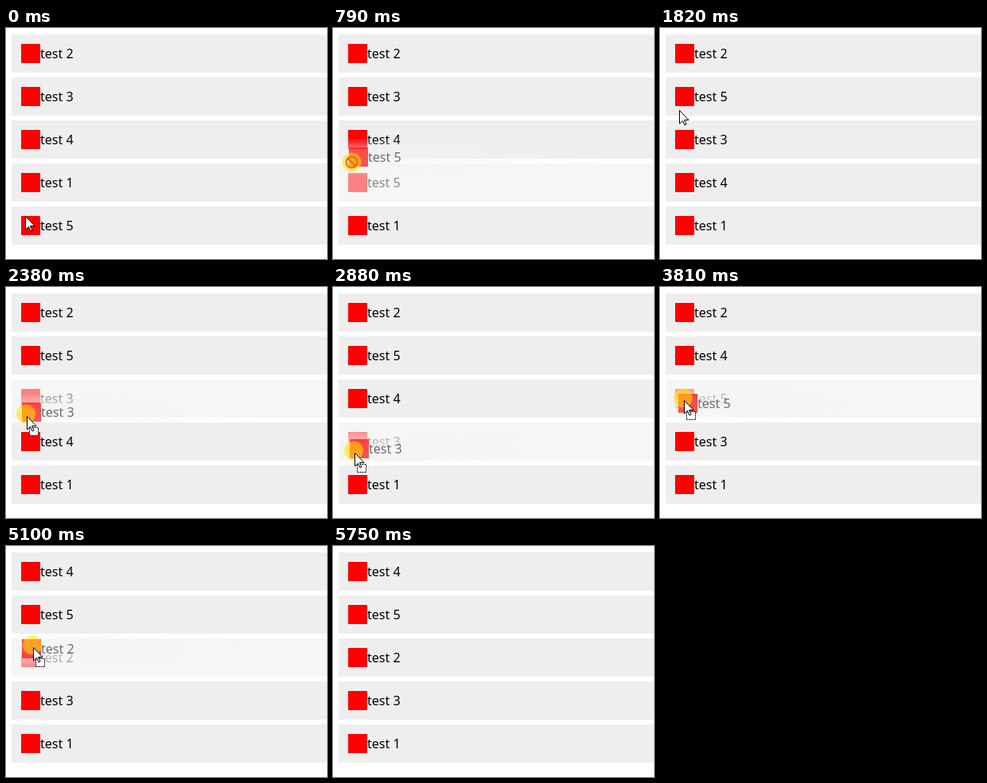
An HTML page with a canvas that plays this animation: 403 px wide and 290 px high, repeating every 5780 ms.

```html
<!DOCTYPE html>
<html lang="en">
<head>
<meta charset="utf-8">
<title>Sortable list</title>
<style>
html, body { margin: 0; width: 100%; height: 100%; overflow: hidden; background: #fff; }
canvas { display: block; }
</style>
</head>
<body>
<canvas id="stage" width="403" height="290"></canvas>
<script>
const ctx = document.getElementById('stage').getContext('2d');
const LOOP = 5780, PITCH = 54, ROW_H = 48, LEFT = 7, TOP = 8;

// The pointer rests, performs four drags, then leaves the stage.
const point = (x, y) => ({ x, y });
const rest = { drop: 50, to: point(24, 236) };
const exit = { press: 5745, from: point(325, 296) };
const drags = [
  { press: 170, stop: 1470, drop: 1640, from: point(22, 254), to: point(24, 74) },
  { press: 2230, stop: 2780, drop: 2960, from: point(25, 145), to: point(27, 208) },
  { press: 3410, stop: 3860, drop: 4050, from: point(26, 82), to: point(31, 149) },
  { press: 4650, stop: 5200, drop: 5300, from: point(33, 30), to: point(34, 148) }
];

const arrow = new Path2D('M0 0V16.5L4 13L6.500 18.500L8.500 17.500L6 12H11.500Z');
const hand = new Path2D('M-2 2Q0-2 2 2V7Q9 6 10 10V16L8 22H-1L-7 13Q-5 10-2 14Z');
const knuckles = new Path2D('M2 7V12M5 8V12M8 9V12');

const progress = (t, from, to) => Math.min(1, Math.max(0, (t - from) / (to - from)));
const mix = (a, b, k) => point(a.x + (b.x - a.x) * k, a.y + (b.y - a.y) * k);
const easeOut = k => k * (3 - k) / 2;

function pointer(t) {
  const active = drags.find(d => t >= d.press && t < d.drop);
  if (active) return mix(active.from, active.to, progress(t, active.press, active.stop));
  const last = drags.findLast(d => t >= d.drop) || rest;
  const next = drags.find(d => t < d.press) || exit;
  return mix(last.to, next.from, easeOut(progress(t, last.drop, next.press)));
}

const slotAt = y => Math.floor((y - TOP) / PITCH);
const inGap = y => y - TOP - slotAt(y) * PITCH >= ROW_H;

// A row gives way once the pointer enters it; gaps keep the last slot.
const targetSlot = (y, startY) => slotAt(y) + (inGap(y) && y < startY ? 1 : 0);

function listAt(t) {
  const order = [2, 3, 4, 1, 5];
  let lifted = null, held = false;
  for (const { press, stop, drop, from, to } of drags) {
    if (t < press) break;
    const now = mix(from, to, progress(t, press, stop));
    const home = slotAt(from.y);
    const [item] = order.splice(home, 1);
    order.splice(targetSlot(now.y, from.y), 0, item);
    held = t < drop;
    if (held && Math.abs(now.y - from.y) > 3)
      lifted = { item, x: LEFT + now.x - from.x, y: TOP + home * PITCH + now.y - from.y };
  }
  return { order, lifted, held };
}

function content(item, x, y, red, ink) {
  ctx.fillStyle = red;
  ctx.fillRect(x + 12, y + 12, 24, 24);
  ctx.fillStyle = ink;
  ctx.fillText('test ' + item, x + 36, y + 30);
}

function drawRow(item, slot, faded) {
  const y = TOP + slot * PITCH;
  ctx.fillStyle = faded ? '#f6f6f6' : '#eee';
  ctx.fillRect(LEFT, y, 396, ROW_H);
  content(item, LEFT, y, faded ? '#ff8080' : '#f00', faded ? '#888' : '#000');
}

// The lifted row fades out around the grab point.
function drawLifted({ item, x, y }) {
  x = Math.round(x);
  y = Math.round(y);
  ctx.save();
  ctx.translate(x, y + ROW_H / 2);
  ctx.scale(14, 1);
  const haze = ctx.createRadialGradient(0, 0, 0, 0, 0, 24);
  haze.addColorStop(0, 'rgba(243,243,243,.85)');
  haze.addColorStop(1, 'rgba(243,243,243,0)');
  ctx.fillStyle = haze;
  ctx.fillRect(0, -24, 28, ROW_H);
  ctx.restore();
  ctx.globalAlpha = 0.7;
  content(item, x, y, '#ff0a0a', '#333');
  ctx.globalAlpha = 1;
}

function outline(shape) {
  ctx.fillStyle = '#fff';
  ctx.fill(shape);
  ctx.stroke(shape);
}

function drawBlocked() {
  ctx.strokeStyle = '#ee6a1c';
  ctx.lineWidth = 2;
  ctx.beginPath();
  ctx.arc(0, 0, 7, 0, 7);
  ctx.moveTo(-5, -5);
  ctx.lineTo(5, 5);
  ctx.stroke();
}

function drawDropBox() {
  ctx.fillStyle = '#fff';
  ctx.fillRect(3, 14, 11, 10);
  ctx.setLineDash([2, 1]);
  ctx.strokeRect(3, 14, 11, 10);
  ctx.setLineDash([]);
}

function drawPointer(t, { x, y }, lifted, held) {
  const blocked = lifted && inGap(y);
  const rowY = y - TOP - slotAt(y) * PITCH;
  const onHandle = t >= rest.drop && x >= 19 && x < 43 && rowY >= 9 && rowY < 36;
  ctx.save();
  ctx.translate(Math.round(x) + 0.5, Math.round(y) + 0.5);
  if (held) {
    ctx.fillStyle = 'rgba(255,230,0,.55)';
    ctx.beginPath();
    ctx.arc(blocked ? 0 : -1.5, blocked ? 0 : -3, 12, 0, 7);
    ctx.fill();
  }
  ctx.strokeStyle = '#000';
  ctx.lineWidth = 1;
  if (blocked) {
    drawBlocked();
  } else if (!lifted && onHandle) {
    outline(hand);
    ctx.stroke(knuckles);
  } else {
    if (lifted) drawDropBox();
    outline(arrow);
  }
  ctx.restore();
}

function draw(t) {
  const { order, lifted, held } = listAt(t);
  ctx.fillStyle = '#fff';
  ctx.fillRect(0, 0, 403, 290);
  ctx.font = '16px "Noto Sans", "Open Sans", sans-serif';
  order.forEach((item, slot) => drawRow(item, slot, lifted && lifted.item === item));
  if (lifted) drawLifted(lifted);
  drawPointer(t, pointer(t), lifted, held);
}

const begin = performance.now();
function tick() {
  draw((performance.now() - begin) % LOOP);
  requestAnimationFrame(tick);
}
tick();
</script>
</body>
</html>
```
